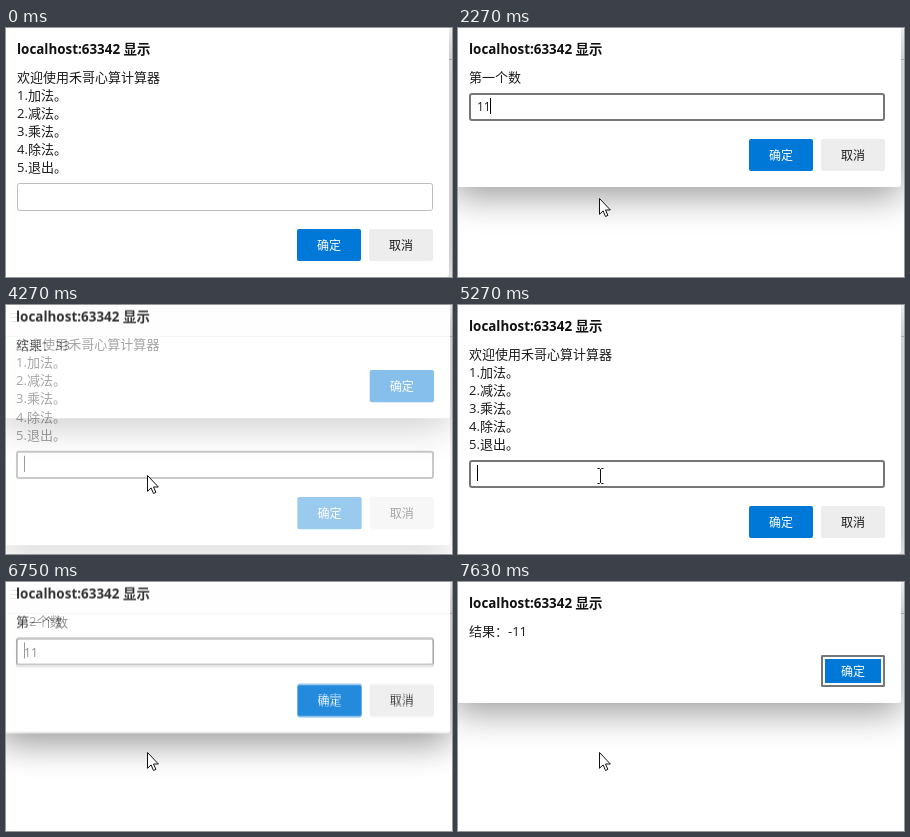
These frames come from a looping animation (446x249 px, 8 s). An HTML page:

```html
<!DOCTYPE html>
<html lang="zh-CN">
<head>
<meta charset="utf-8">
<style>
html, body { margin: 0; width: 100%; height: 100%; overflow: hidden; background: #fff; }
svg { display: block; width: 446px; height: 249px; }
text { font: 13px "Open Sans", "Noto Sans CJK SC", "Noto Sans CJK", sans-serif; fill: #1b1b1b; white-space: pre; }
.title { font-size: 13.4px; font-weight: 700; fill: #111; }
.btn { font-size: 12px; text-anchor: middle; }
.light { fill: #fff; font-weight: 500; }
.typed { font-size: 12px; }
</style>
</head>
<body>
<svg id="stage" viewBox="0 0 446 249">
  <defs>
    <filter id="soft" filterUnits="userSpaceOnUse" x="-90" y="-90" width="630" height="460">
      <feGaussianBlur stdDeviation="18"/>
    </filter>
  </defs>
  <rect width="446" height="249" fill="#fff"/>
  <rect width="446" height="31" fill="#fbfbfb"/>
  <path d="M0 31.5H446" stroke="#c9c9c9"/>
  <path d="M4 8.5h8M4 12.5h8M4 16.5h8" stroke="#777"/>
  <g id="dialogs"></g>
  <g id="arrow">
    <path d="M.5 .5V16.3L4.1 12.9 6.5 18.5 8.9 17.4 6.5 12H11.4Z" fill="#fff" stroke="#111"/>
  </g>
  <g id="beam">
    <path d="M-2.5 -7.5H-.5L.5 -6.5 1.5 -7.5H3.5M.5 -6.5V6.5M-2.5 7.5H-.5L.5 6.5 1.5 7.5H3.5" fill="none" stroke="#111"/>
  </g>
</svg>
<script>
const LOOP = 8000;
const $ = id => document.getElementById(id);
const NS = 'http://www.w3.org/2000/svg';
const menu = ['欢迎使用禾哥心算计算器', '1.加法。', '2.减法。', '3.乘法。', '4.除法。', '5.退出。'];

// in: times of the opening steps; keys: when the typed value changes
const scenes = [
  { lines: menu, in: [0], keys: [[1130, '1']] },
  { lines: ['第一个数'], in: [1530, 1600, 1670], keys: [[2000, '1'], [2270, '11']] },
  { lines: ['第2个数'], in: [2470, 2540, 2600, 2670], keys: [[2940, '2'], [3140, '22']] },
  { lines: ['结果：33'], in: [3340, 3410, 3470, 3540] },
  { lines: menu, in: [4210, 4270, 4340, 4400], keys: [[5340, '2']] },
  { lines: ['第一个数'], in: [5670, 5740, 5810, 5880], keys: [[6150, '1'], [6420, '11']] },
  { lines: ['第2个数'], in: [6680, 6750, 6810, 6880], keys: [[7020, '2'], [7220, '22']] },
  { lines: ['结果：-11'], in: [7420, 7490, 7560, 7630] }
];

// [opacity, vertical shift, scale] at each step of a change of dialog
const leaving = [[1, -1, 1], [.77, -8.3, 1.005], [.22, -13, 1.008], [0, 0, 1]];
const opening = [[0, 0, 1], [.39, -10, 1.005], [.9, -2, 1.001], [1, 0, 1]];

const rect = (x, y, w, h, more) => `<rect x="${x}" y="${y}" width="${w}" height="${h}" ${more}/>`;
const text = (x, y, s, cls = '') => `<text x="${x}" y="${y}" class="${cls}">${s}</text>`;
const button = (x, y, s, fill, cls) =>
  rect(x, y, 64, 32, `rx="2" fill="${fill}"`) + text(x + 32, y + 20.5, s, 'btn ' + cls);

function build(s) {
  const top = 65 + (s.lines.length - 1) * 18;
  const bottom = s.keys ? top + 94 : 121;
  let html = rect(-5, 8, 448, bottom - 8 + 9, 'fill="#000" opacity=".4" filter="url(#soft)"')
    + rect(-5, -3, 448, bottom + 3, 'rx="3" fill="#fff"')
    + text(11, 25.5, 'localhost:63342 显示', 'title');
  s.lines.forEach((l, i) => html += text(11, 53.5 + i * 18.1, l));
  if (s.keys) {
    html += rect(11.5, top + .5, 415, 27, 'rx="2" fill="#fff" stroke="#bdbdbd" class="idle"')
      + rect(12, top + 1, 414, 26, 'rx="2" fill="#fff" stroke="#767676" stroke-width="2" class="focus"')
      + text(19, top + 17.5, '', 'typed')
      + rect(19, top + 5, 1, 16, 'fill="#000" class="caret"')
      + button(291, top + 46, '确定', '#0078d7', 'light')
      + button(363, top + 46, '取消', '#ededed', '');
  } else {
    html += button(363, 73, '确定', '#0078d7', 'light')
      + '<g class="focus">' + rect(365.5, 75.5, 59, 27, 'fill="none" stroke="#fff" stroke-width="3"')
      + rect(364, 74, 62, 30, 'rx="1" fill="none" stroke="#767676" stroke-width="2"') + '</g>';
  }
  const g = document.createElementNS(NS, 'g');
  g.innerHTML = html;
  $('dialogs').append(g);
  s.node = g;
  s.find = c => g.querySelector('.' + c);
}
scenes.forEach(build);

const show = (el, on) => el.setAttribute('visibility', on ? 'visible' : 'hidden');

function place(s, [alpha, dy, k]) {
  s.node.style.display = alpha ? '' : 'none';
  s.node.setAttribute('opacity', alpha);
  s.node.setAttribute('transform', `translate(${220 * (1 - k)} ${dy}) scale(${k})`);
}

// Step of the four-step change; shorter changes skip the first ones
function step(times, t) {
  const n = times.filter(x => x <= t).length;
  return n ? n - 1 + 4 - times.length : -1;
}

function fill(s, t, focused) {
  show(s.find('focus'), focused);
  if (!s.keys) return;
  show(s.find('idle'), !focused);
  const typed = s.keys.filter(k => k[0] <= t).map(k => k[1]).pop() || '';
  s.find('typed').textContent = typed;
  const caret = s.find('caret');
  caret.setAttribute('x', [19, 26, 32][typed.length]);
  show(caret, focused && !(t >= 4740 && t < 5270));
}

function pointer(t, active, closing) {
  const p = Math.min(9, Math.floor((t - 190) / 80)) / 9;
  const e = 1 - (1 - p) * (1 - p);
  const x = 160 - 19 * e, y = 238 - 68 * e;
  const seen = t >= 190;
  const beam = active.lines === menu && !closing && y < 183;
  show($('arrow'), seen && !beam);
  show($('beam'), seen && beam);
  $('arrow').setAttribute('transform', `translate(${Math.round(x)} ${Math.round(y)})`);
  $('beam').setAttribute('transform', `translate(${Math.round(x) + 1} ${Math.round(y) + 1})`);
}

function draw(t) {
  let active = scenes[0], closing = false;
  scenes.forEach((s, i) => {
    const next = scenes[i + 1];
    const a = i ? step(s.in, t) : 3;
    const b = next ? step(next.in, t) : -1;
    place(s, a < 0 ? opening[0] : b >= 0 ? leaving[b] : opening[a]);
    fill(s, t, b < 0 && (i > 0 || t >= 910));
    if (a === 3 && b < 3) { active = s; closing = b >= 0; }
  });
  pointer(t, active, closing);
}

const start = performance.now();
function tick() {
  draw((performance.now() - start) % LOOP);
  requestAnimationFrame(tick);
}
tick();
</script>
</body>
</html>
```
